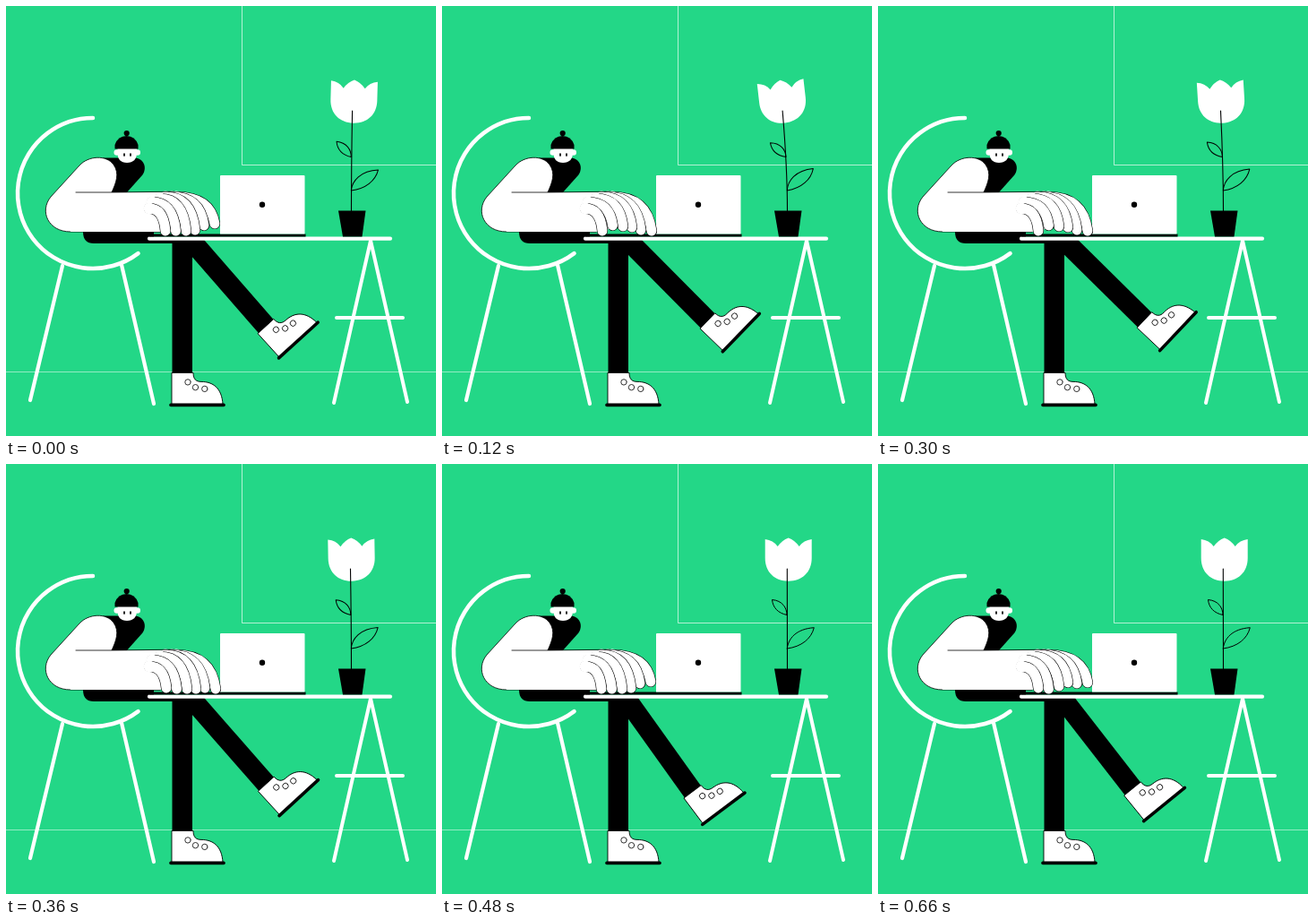
Recreate the animation shown at these times as an HTML page with a canvas. Size 480 by 480 pixels, loop 0.72 s.

```html
<!DOCTYPE html>
<html lang="en">
<head>
<meta charset="utf-8">
<title>Typing at the desk</title>
<style>
html, body { margin: 0; width: 100%; height: 100%; overflow: hidden; background: #23d787; }
canvas { display: block; width: 480px; height: 480px; }
</style>
</head>
<body>
<canvas id="stage" width="480" height="480"></canvas>
<script>
const ctx = document.getElementById('stage').getContext('2d');
const STEP = 60, STEPS = 12;
const GREEN = '#23d787', BLACK = '#000', WHITE = '#fff';
const rad = deg => deg * Math.PI / 180;

// One value per step: leg swing in degrees, flower shift in pixels, hand pose.
const SWING = [0, -1.9, -3.7, -7.2, -6.6, -4.3, -0.2, 3, 5.5, 6.2, 5.2, 3.2];
const SWAY = [1.6, -3, -6.5, -6, -5, -3.5, -1, -0.3, 0, 0.2, 0.2, 0];
const TYPING = 'ADBCABDCADBC';

// Root and resting tip of each finger, furthest first.
const FINGERS = [
  [190, 213, 233, 243], [185, 213, 221, 245],
  [178, 213, 211, 250], [172, 215, 201, 251],
  [163, 219, 189.5, 251], [160, 226, 178, 251]
];
// Tip offsets in the same order as FINGERS.
const POSES = {
  A: { x: 0, y: [0, 0, 0, 0, 0, 0] },
  B: { x: 1, y: [8, 5, -3, -5, -6, 0] },
  C: { x: 1, y: [1, 0, -6, -3, 0, -1] },
  D: { x: 1, y: [8, 5, 1, 0, 0, -1] }
};

function shape(d, fill, stroke, width = 1) {
  const path = new Path2D(d);
  if (fill) { ctx.fillStyle = fill; ctx.fill(path); }
  if (stroke) { ctx.strokeStyle = stroke; ctx.lineWidth = width; ctx.stroke(path); }
}

function dot(x, y, r, fill, stroke) {
  ctx.beginPath();
  ctx.arc(x, y, r, 0, 7);
  if (fill) { ctx.fillStyle = fill; ctx.fill(); }
  if (stroke) { ctx.strokeStyle = stroke; ctx.lineWidth = 0.8; ctx.stroke(); }
}

function turned(x, y, deg, draw) {
  ctx.save();
  ctx.translate(x, y);
  ctx.rotate(rad(deg));
  draw();
  ctx.restore();
}

function room() {
  ctx.fillStyle = GREEN;
  ctx.fillRect(0, 0, 480, 480);
  shape('M263.5 0V177.5H480', null, 'rgba(255,255,255,.65)');
  shape('M0 408.5H480', null, 'rgba(255,255,255,.5)');
}

function chair() {
  ctx.beginPath();
  ctx.arc(97, 209, 84, rad(53), rad(270));
  ctx.strokeStyle = WHITE;
  ctx.lineWidth = 4.5;
  ctx.stroke();
  shape('M63 290L27 440M129 289L165 444', null, WHITE, 4.2);
}

// Origin at the heel, sole along the x axis.
function shoe() {
  shape('M2 -1V-36H26C26 -29 29 -26 35 -26C48 -26 58 -19 59 -1Z', WHITE, BLACK, 0.9);
  for (const [x, y] of [[20, -25.5], [28.5, -19.7], [38.8, -18]]) dot(x, y, 3.2, WHITE, BLACK);
  shape('M1 0H60', null, BLACK, 3.6);
}

function legs(swing) {
  shape('M86 250H165V258H208V265H98Q86 265 86 252Z', BLACK);
  ctx.fillStyle = BLACK;
  ctx.fillRect(185.5, 258, 22.5, 152);
  turned(183, 445.4, 0, shoe);
  ctx.save();
  ctx.beginPath();
  ctx.rect(0, 258, 480, 222);
  ctx.clip();
  turned(199, 254, swing, () => {
    ctx.translate(-199, -254);
    shape('M208 246L299.5 351L282.5 365.8L191 260.8Z', BLACK);
    turned(303.8, 393.6, -42.3, shoe);
  });
  ctx.restore();
}

function desk() {
  shape('M407 262L366 443M407 262L448 442M369 348H443', null, WHITE, 4);
  shape('M160 259.7H429', null, WHITE, 4.2);
  ctx.fillStyle = BLACK;
  ctx.fillRect(160, 254.5, 174.5, 3);
  shape('M240 189H332.5Q333.5 189 333.5 190V254.5H239V190Q239 189 240 189Z', WHITE);
  dot(286, 221.7, 3.2, BLACK);
}

function flower(sway) {
  const top = 385.3 + sway * 0.8;
  turned(386.7 + sway, 107, sway, () => shape(
    'M-26 -23Q-17 -22 -12 -15Q-7 -22 0 -24.5Q7 -22 12 -15Q17 -22 26 -23V-2' +
    'C26 14 15 23.7 0 23.7C-15 23.7 -26 14 -26 -2Z', WHITE));
  shape(`M385.5 229Q385.5 180 ${top} 117`, null, BLACK, 1.1);
  turned(385 + sway * 0.15, 168.5, sway * 0.6, () =>
    shape('M0 0C0 -8 -5 -16 -16.5 -17C-15.5 -8 -10 -2 0 0Z', null, BLACK, 1));
  turned(385.3, 206, sway * 0.35, () =>
    shape('M0 0C1 -11 10 -22 30 -23.3C27 -11 16 -2 0 0Z', null, BLACK, 1));
  shape('M371 228.5H401.5L397.5 257.5H376Z', BLACK);
}

function body() {
  shape('M108 169.5H145C154 171 158 181 152 189L135 208H114Z', BLACK);
  dot(123.7, 163.5, 3.2, WHITE);
  dot(146.8, 163.5, 3.2, WHITE);
  shape('M124.5 158H146V164C146 171 142 175 135 175C128 175 124.5 171 124.5 164Z', WHITE);
  shape('M121.5 159.5V155Q125 145 134.5 145Q144 145 147.5 155V159.5Z', BLACK);
  dot(134.7, 142, 3.1, BLACK);
  shape('M132 165V167M139 165V167', null, BLACK, 1.7);
}

function finger([x, y, tipX, tipY], dx, dy) {
  const tx = tipX + dx, ty = tipY + dy;
  const d = `M${x} ${y}Q${tx - 0.12 * (tx - x)} ${y} ${tx} ${ty}`;
  shape(d, null, BLACK, 12.2);
  shape(d, null, WHITE, 11);
  dot(x, y, 6.4, WHITE);
}

function arm(pose) {
  const { x, y } = POSES[pose];
  shape('M172 252.3L72 252C47 252 37 229 50 213L82 178C92 167 112 166 120 177C127 187 123 197 118 208',
    WHITE, BLACK, 0.8);
  shape('M78 208H195L212 216L222 230L220 242L172 251.9H72Z', WHITE);
  FINGERS.forEach((f, i) => finger(f, x, y[i]));
  shape('M78 208L118 208L188 207.2', null, BLACK, 0.8);
}

function render(time) {
  const step = Math.floor(time / STEP) % STEPS;
  ctx.lineCap = 'round';
  ctx.lineJoin = 'round';
  room();
  chair();
  legs(SWING[step]);
  desk();
  flower(SWAY[step]);
  body();
  arm(TYPING[step]);
}

const start = performance.now();
function tick() {
  render(performance.now() - start);
  requestAnimationFrame(tick);
}
tick();
</script>
</body>
</html>
```
